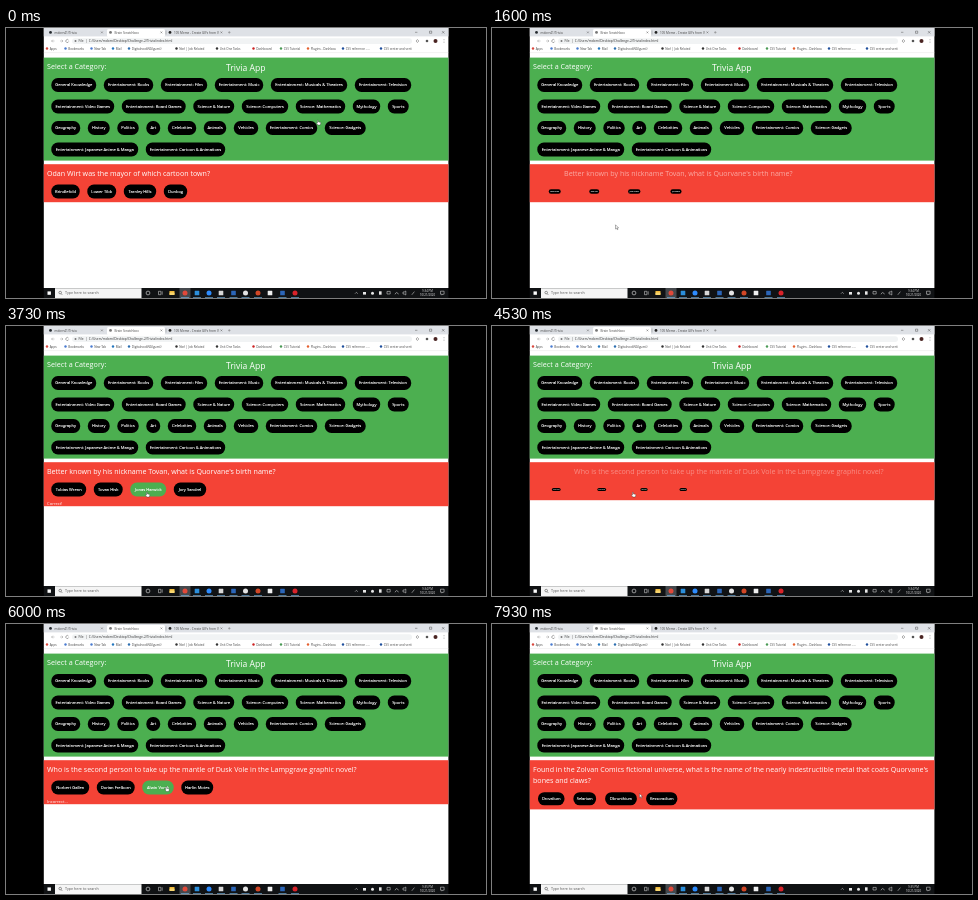
An HTML page that plays this animation: 480 px wide and 270 px high, repeating every 8 s.

```html
<!DOCTYPE html>
<html lang="en">
<head>
<meta charset="utf-8">
<title>Trivia App</title>
<style>
html, body { margin: 0; width: 100%; height: 100%; overflow: hidden; background: #000; }
svg { display: block; width: 100vw; height: 100vh; }
text { font-family: "Open Sans", "Noto Sans", sans-serif; white-space: pre; }
</style>
</head>
<body>
<svg id="stage" viewBox="0 0 480 270" xmlns="http://www.w3.org/2000/svg">
  <g id="back"></g>
  <g id="live"></g>
</svg>
<script>
const LOOP = 8000, GREEN = '#4caf50', RED = '#f44336';
const back = document.getElementById('back'), live = document.getElementById('live');

const rect = (x, y, w, h, fill, rx = 0) =>
  `<rect x="${x}" y="${y}" width="${w}" height="${h}" rx="${rx}" fill="${fill}"/>`;
const dot = (x, y, r, fill) => `<circle cx="${x}" cy="${y}" r="${r}" fill="${fill}"/>`;
const ring = (x, y, r, color, w) =>
  `<circle cx="${x}" cy="${y}" r="${r}" fill="none" stroke="${color}" stroke-width="${w}"/>`;
const line = (d, color = '#555', w = 0.5) =>
  `<path d="${d}" fill="none" stroke="${color}" stroke-width="${w}"/>`;
const label = (x, y, size, str, fill = '#fff', more = '') =>
  `<text x="${x}" y="${y}" font-size="${size}" fill="${fill}" ${more}>${str.replace(/&/g, '&amp;')}</text>`;

const clamp = v => Math.max(0, Math.min(1, v));
const mix = (a, b, k) => a + (b - a) * k;

// CSS "ease": cubic-bezier(.25, .1, .25, 1)
function ease(x) {
  if (x <= 0) return 0;
  if (x >= 1) return 1;
  let lo = 0, hi = 1;
  for (let i = 0; i < 18; i++) {
    const s = (lo + hi) / 2;
    const bx = 0.75 * s * (1 - s) * (1 - s) + 0.75 * s * s * (1 - s) + s * s * s;
    if (bx < x) lo = s; else hi = s;
  }
  const s = lo;
  return 0.3 * s * (1 - s) * (1 - s) + 3 * s * s * (1 - s) + s * s * s;
}

// hover: 0 black .. 1 green
function pill(x, next, cy, str, hover = 0, scale = 1, alpha = 1) {
  const w = next - x - 7.6, cx = x - 4.2 + w / 2;
  const fill = `rgb(${[76, 175, 80].map(c => Math.round(c * hover))})`;
  return `<g transform="translate(${cx} ${cy}) scale(${scale})" opacity="${alpha}">` +
    rect(-w / 2, -6.9, w, 13.8, fill, 6.6) +
    label(0, 1.4, 4.08, str, '#fff', 'text-anchor="middle" stroke="#fff" stroke-width=".12"') + '</g>';
}

const pillRow = (names, xs, cy, look = () => []) =>
  names.map((n, i) => pill(xs[i], xs[i + 1], cy, n, ...look(i))).join('');

const E = 'Entertainment: ', S = 'Science: ';
const categories = [
  [['General Knowledge', E + 'Books', E + 'Film', E + 'Music', E + 'Musicals & Theatres', E + 'Television'],
    [49.5, 102, 159, 213, 269, 353, 417]],
  [[E + 'Video Games', E + 'Board Games', 'Science & Nature', S + 'Computers', S + 'Mathematics', 'Mythology', 'Sports'],
    [49.5, 120, 191.5, 240, 294, 351, 386, 414.5]],
  [['Geography', 'History', 'Politics', 'Art', 'Celebrities', 'Animals', 'Vehicles', E + 'Comics', S + 'Gadgets'],
    [49.5, 86, 115.5, 144.5, 166, 202, 232, 264, 323, 371.5]],
  [[E + 'Japanese Anime & Manga', E + 'Cartoon & Animations'], [49.5, 144, 231]]
];

// at: moment the card swaps; from: start of its entrance
const cards = [
  { at: 0, from: -3000, ask: ['Odan Wirt was the mayor of which cartoon town?'],
    opts: ['Brindlefold', 'Lower Tibb', 'Tarnley Hills', 'Dunbog'], xs: [49.5, 85.5, 122, 162, 193] },
  { at: 1600, from: 1380, ask: ["Better known by his nickname Tovan, what is Quorvane's birth name?"],
    opts: ['Tobias Wrenn', 'Tovan Hisk', 'Jonas Harwick', 'Jory Sandrel'], xs: [49.5, 92, 128.5, 172, 212],
    hover: 2130, click: 2400, told: 2600, verdict: 'Correct!' },
  { at: 4400, from: 4360, ask: ['Who is the second person to take up the mantle of Dusk Vole in the Lampgrave graphic novel?'],
    opts: ['Norbert Gallen', 'Dorian Frelborn', 'Alwin Vorsk', 'Harlin Motes'], xs: [49.5, 95, 140.5, 179.5, 219],
    hover: 4500, click: 5330, told: 5400, verdict: 'Incorrect...' },
  { at: 7270, from: 7210, ask: ['Found in the Zolvan Comics fictional universe, what is the name of the nearly indestructible metal that coats Quorvane\'s',
    'bones and claws?'],
    opts: ['Drovalium', 'Selarium', 'Obrunthium', 'Kessoradium'], xs: [49.5, 85, 116.5, 157.5, 198] }
];

function drawCard(c, t) {
  const extra = (c.ask.length - 1) * 11.2;
  const told = c.told && t >= c.told;
  const slide = ease((t - c.from) / 700), grow = ease((t - c.from) / 1000);
  const hover = c.hover ? ease((t - c.hover) / 400) : 0;
  const flash = c.click ? Math.sin(Math.PI * clamp((t - c.click) / 270)) : 0;
  let out = rect(37.8, 136.2, 404.6, 38 + extra + (told ? 6 : 0), RED);
  c.ask.forEach((s, i) => {
    out += label(41 + 68 * (1 - slide), 147.7 + i * 11.2, 7.1, s, '#fff', `opacity="${slide}"`);
  });
  out += pillRow(c.opts, c.xs, 163.5 + extra, i =>
    i === 2 ? [hover, grow, 1 - 0.5 * flash] : [0, grow]);
  if (told) out += label(41, 178.6, 4.2, c.verdict, '#fff', `opacity="${0.4 + 0.6 * ease((t - c.told) / 300)}"`);
  return out;
}

// time, x, y of the pointer tip
const path = [
  [0, 311.5, 92], [70, 311.5, 92], [330, 303, 98], [930, 304, 98], [1130, 168, 172], [1330, 130, 196],
  [1600, 123.5, 196.8], [1850, 126, 192], [2270, 140.5, 166], [4600, 140.5, 166], [5130, 160, 162.5],
  [6600, 160, 162.5], [7000, 159, 162.5], [7270, 159, 162.5], [7800, 147.5, 169.5], [LOOP, 147.5, 169.5]
];

function pointer(t) {
  const i = path.findIndex((p, n) => n && t <= p[0]);
  const a = path[i - 1], b = path[i];
  const u = (t - a[0]) / (b[0] - a[0]), k = u * u * (3 - 2 * u);
  const hand = t < 1000 || (t > 2130 && t < 4400) || (t > 4450 && t < 7270);
  const d = hand
    ? 'M0 .2Q.7-.3 .9.4V1.9L2.9 2.3Q3.4 2.5 3.3 3.2L2.8 5H.3L-1.1 3.1Q-1 2.4-.1 3Z'
    : 'M0 0V4.2L1 3.3 1.7 4.9 2.4 4.6 1.7 3.1H3.1Z';
  return `<path transform="translate(${mix(a[1], b[1], k)} ${mix(a[2], b[2], k)})" d="${d}" fill="#fff" stroke="#222" stroke-width=".35"/>`;
}

function browser() {
  const ink = '#444';
  let s = rect(37.8, 0, 404.6, 260, '#fff') + rect(37.8, 0, 404.6, 8.4, '#dee1e6') +
    rect(101, 1, 58, 8, '#fff', 1.5);
  [[43, 'mdorn41/Trivia', '#24292e'], [103, 'Brain Scratchbox', '#777'], [162.5, '105 Meme - Create GIFs from V', '#222']]
    .forEach(([x, str, c], i) => {
      s += dot(x + 1.5, 4.4, 1.4, c) + label(x + 5.5, 5.5, 3.1, str, ink);
      const e = [95, 154.5, 214.5][i];
      s += line(`M${e} 3.5l1.8 1.8m0-1.8l-1.8 1.8`, ink, 0.4);
    });
  s += line('M160 2.5v4M222 4.4h2.6m-1.3-1.3v2.6', '#666', 0.4) +
    line('M409 4.3h2.4M423.5 3.1h2.2v2.2h-2.2zM436 3.1l2.4 2.4m0-2.4l-2.4 2.4', '#333', 0.4);
  s += line('M48.5 13h-3m1.3-1.3l-1.3 1.3 1.3 1.3M54 13h3m-1.3-1.3l1.3 1.3-1.3 1.3', '#999') +
    line('M62.5 12.1a1.5 1.5 0 1 0 .2 1.4') +
    rect(66, 10.2, 340, 5.8, '#f1f3f4', 2.9) + dot(69.5, 13.1, 1, '#777') +
    label(72.5, 14.3, 3.25, 'File  |  C:/Users/mdorn/Desktop/Challenge-2/Trivia/index.html', '#333');
  s += line('M410 13l1.4-1.5 1.4 1.5-1.4 1.5z') + dot(421, 13, 1.3, '#555') + dot(429.5, 13, 2, '#4a2422') +
    [11.7, 13, 14.3].map(y => dot(438, y, 0.35, '#444')).join('');
  [[41, 'Apps', '#d8483e'], [59.5, 'Bookmarks', '#4a7bd0'], [85.5, 'New Tab', '#4a7bd0'], [107, 'Mail', '#2477be'],
    [123, 'DigitalnookNG(guest)', '#2d6fb0'], [170.5, 'Norl | Job Related', '#333'], [211, 'Unit One Tasks', '#333'],
    [247.5, 'Dashboard', '#c22'], [275, 'CSS Tutorial', '#4a9a55'], [302, 'Plugins - Dashboa', '#e5602f'],
    [337, 'CSS reference - ...', '#1f4f9c'], [375, 'CSS center and verti', '#1f4f9c']]
    .forEach(([x, str, c]) => { s += dot(x, 20.5, 1.2, c) + label(x + 2.7, 21.6, 3, str, ink); });
  return s + line('M37.8 24.6H442.4', '#ddd', 0.4);
}

function taskbar() {
  const ink = '#e8e8e8';
  let s = rect(37.8, 260, 404.6, 10, '#101214') + rect(41.5, 263.4, 3.4, 3.4, '#fff') +
    rect(49, 260.2, 86.5, 9.8, '#f5f5f5') +
    ring(54.2, 264.6, 1.3, '#333', 0.5) + line('M55.1 265.6l1.2 1.3', '#333') +
    label(59, 266.4, 3.7, 'Type here to search', '#555') +
    ring(142, 265, 1.9, ink, 0.6) +
    line('M152.5 263.3h2.4v3.4h-2.4zM156.2 263.3v3.4', ink) +
    rect(163.5, 263, 5, 4, '#f0b93a', 0.4) + rect(163.5, 264.5, 5, 2.5, '#f7d56f', 0.4) +
    rect(173.5, 260, 11, 10, '#45494d');
  [[179, '#e0493a', 1], [191, '#2b8fdc'], [203, '#2d8cff', 1], [215, '#d8d8d8'], [227.5, '#2b66b9'],
    [239.5, '#e4e4e4', 1], [252, '#d24726', 1], [264, '#f0f0f0'], [276.5, '#2b66b9'], [289, '#d8232a', 1]]
    .forEach(([x, c, round]) => {
      s += round ? dot(x, 265, 2.5, c) : rect(x - 2.3, 262.7, 4.6, 4.6, c, 0.4);
      if (x !== 264) s += rect(x - 4, 269.4, 8, 0.6, '#76b9ed');
    });
  s += line('M349 265.7l1.4-1.4 1.4 1.4M381 263.4h3.2v2.6h-3.2zM389 266.3q1.7-3.6 3.4 0M397 264h1.2l1.6-1v4l-1.6-1H397zM405.8 266.8l2.6-3.2', ink) +
    rect(357, 264, 3, 2.6, ink) + dot(366.5, 265.2, 1.5, ink) + rect(373, 263.3, 2.6, 3.4, ink) +
    line('M434.5 263.2h3.6v3h-1.4l-.8.9v-.9h-1.4z', ink);
  return s + label(421.5, 267.9, 2.9, '10/21/2020', ink, 'text-anchor="middle"');
}

back.innerHTML = rect(0, 0, 480, 270, '#000') + browser() + rect(37.8, 29.6, 404.6, 103, GREEN) +
  label(41, 41.1, 7.2, 'Select a Category:') + label(220, 42.6, 8.6, 'Trivia App') +
  categories.map(([names, xs], r) => pillRow(names, xs, 57 + r * 21.5)).join('') + taskbar();

function update(t) {
  const card = cards.filter(c => t >= c.at).pop();
  let out = drawCard(card, t);
  // the chosen category stays lit until the new card arrives
  if (t > 70 && t < 1600) out += pill(264, 323, 100, E + 'Comics', ease((t - 70) / 300));
  out += label(421.5, 264.2, 2.9, t < 4670 ? '9:34 PM' : '9:35 PM', '#e8e8e8', 'text-anchor="middle"');
  live.innerHTML = out + pointer(t);
}

const start = performance.now();
function tick() {
  update((performance.now() - start) % LOOP);
  requestAnimationFrame(tick);
}
update(0);
requestAnimationFrame(tick);
</script>
</body>
</html>
```
